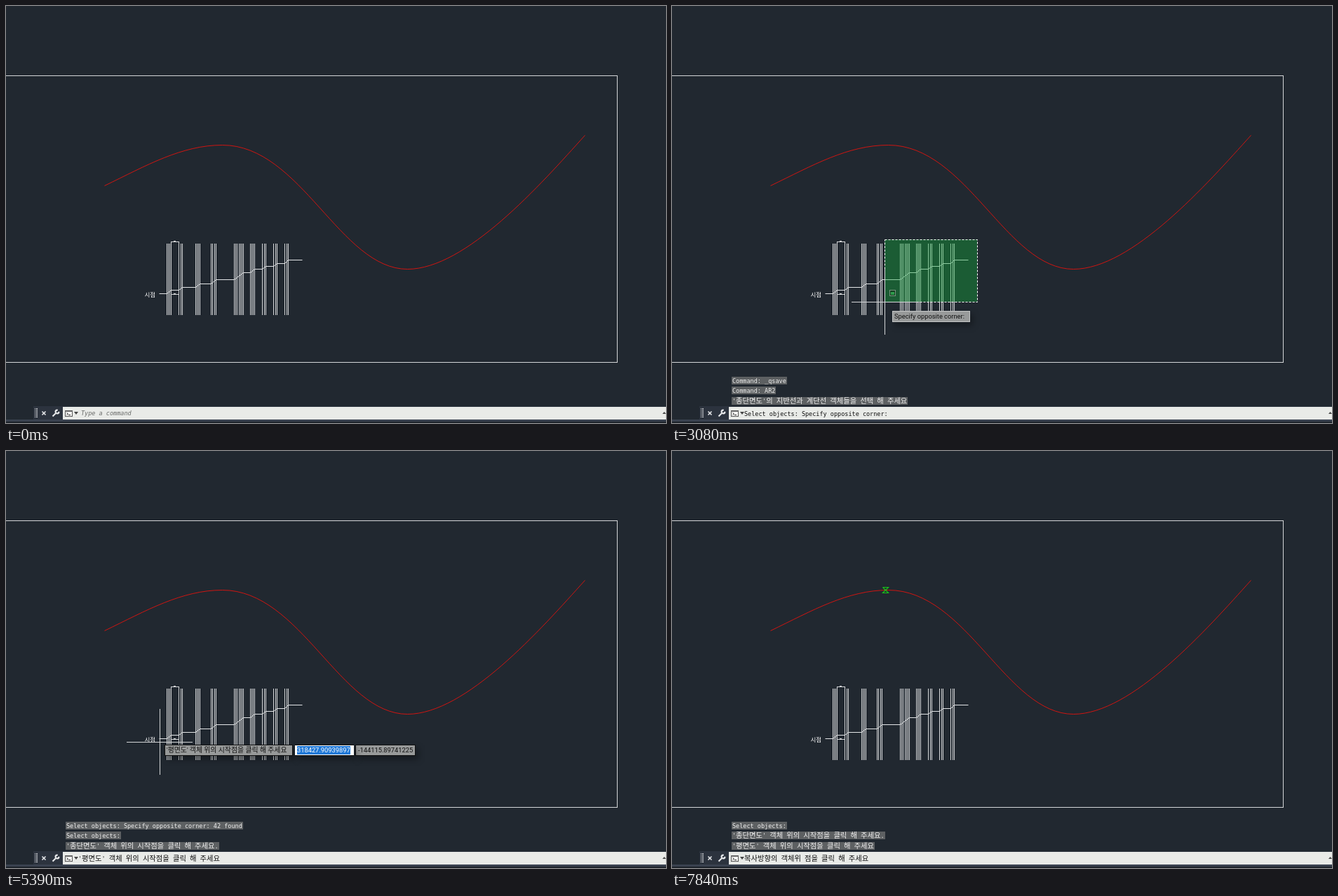
Animation of 941x595 px, one loop 8000 ms. Source, as an HTML page with a canvas:

```html
<!DOCTYPE html>
<html lang="ko">
<head>
<meta charset="utf-8">
<style>
html, body { margin: 0; width: 100%; height: 100%; overflow: hidden; background: #212830; }
canvas { display: block; }
</style>
</head>
<body>
<canvas id="stage" width="941" height="595"></canvas>
<script>
const ctx = document.getElementById('stage').getContext('2d');
const LOOP = 8000, STEP = 70;
const HANGUL = '"Noto Sans CJK KR", "Noto Sans CJK JP", sans-serif';
const MONO = ['8.5px "DejaVu Sans Mono", monospace', '10.3px ' + HANGUL];
const SANS = ['9.3px Roboto, "Open Sans", sans-serif', '9.9px ' + HANGUL];
const LINE = '#d4d6d8', GREEN = '#18c418', GRAY = '#989a9a', LIGHT = '#c4c6c6', INK = '#111';

const ASK_LINES = "'종단면도'의 지반선과 계단선 객체들을 선택 해 주세요";
const ASK_PROFILE = "'종단면도' 객체 위의 시작점을 클릭 해 주세요.";
const ASK_PLAN = "'평면도' 객체 위의 시작점을 클릭 해 주세요";
const ASK_DIRECTION = '복사방향의 객체위 점을 클릭 해 주세요';
const SELECT = 'Select objects:', CORNER = 'Specify opposite corner:';
const FOUND = `${SELECT} ${CORNER} 42 found`;

const log = ['Command: _qsave', 'Command: AR2', ASK_LINES, FOUND, SELECT, ASK_PROFILE, ASK_PLAN];
const prompts = [
  { at: 2310, bar: SELECT, logEnd: 3 },
  { at: 2730, bar: `${SELECT} ${CORNER}`, logEnd: 3, still: true },
  { at: 3570, bar: SELECT, logEnd: 4 },
  { at: 4270, bar: ASK_PROFILE, logEnd: 5 },
  { at: 5250, bar: ASK_PLAN, logEnd: 6 },
  { at: 6790, bar: ASK_DIRECTION, logEnd: 7 }
];

// Each hop eases the cursor to (x, y) between two times.
const cursorStart = [448, 392];
const hops = [
  { from: 980, to: 1330, x: 464, y: 394 },
  { from: 2380, to: 2660, x: 435, y: 333 },
  { from: 2730, to: 3080, x: 303, y: 422 },
  { from: 3080, to: 3360, x: 201, y: 465 },
  { from: 3780, to: 4200, x: 221, y: 425 },
  { from: 4200, to: 4340, x: 219, y: 415 },
  { from: 5390, to: 5880, x: 136, y: 248 },
  { from: 6370, to: 6650, x: 139, y: 255 },
  { from: 6790, to: 7490, x: 304, y: 192 }
];

// Flights of stairs along the profile: left edge and width
const flights = [[229, 6], [246, 5], [270, 6], [292, 7], [325, 13], [348, 6], [365, 5], [381, 5], [397, 5]];
const SLOPE = 0.82;

function rect(x, y, w, h, color) {
  ctx.fillStyle = color;
  ctx.fillRect(x, y, w, h);
}
const hLine = (x0, x1, y, color = LINE) => rect(x0, y, x1 - x0 + 1, 1, color);
const vLine = (x, y0, y1, color = LINE) => rect(x, y0, 1, y1 - y0 + 1, color);

function frame(x, y, w, h, color) {
  ctx.strokeStyle = color;
  ctx.lineWidth = 1;
  ctx.strokeRect(x + 0.5, y + 0.5, w - 1, h - 1);
}

function polyline(points, color, width = 1) {
  ctx.beginPath();
  for (const [x, y] of points) ctx.lineTo(x + 0.5, y + 0.5);
  ctx.strokeStyle = color;
  ctx.lineWidth = width;
  ctx.stroke();
}

function triangle(x, y, half, height) {
  ctx.beginPath();
  ctx.moveTo(x - half, y);
  ctx.lineTo(x + half, y);
  ctx.lineTo(x, y + height);
  ctx.fillStyle = '#444';
  ctx.fill();
}

// Lays out Latin and Hangul runs; only measures when no colour is given.
function label(text, fonts, x, y, color) {
  let width = 0;
  for (const run of text.match(/[가-힣]+|[^가-힣]+/g) || []) {
    ctx.font = fonts[/[가-힣]/.test(run) ? 1 : 0];
    if (color) {
      ctx.fillStyle = color;
      ctx.fillText(run, x + width, y);
    }
    width += ctx.measureText(run).width;
  }
  return width;
}
const widthOf = (text, fonts) => Math.round(label(text, fonts, 0, 0));

function cursorAt(t) {
  let [x, y] = cursorStart;
  for (const hop of hops) {
    const u = Math.min(1, Math.max(0, (t - hop.from) / (hop.to - hop.from)));
    const k = u * u * (3 - 2 * u);
    x += (hop.x - x) * k;
    y += (hop.y - y) * k;
  }
  return [Math.round(x), Math.round(y)];
}

function drawPlan() {
  rect(0, 0, 941, 595, '#212830');
  hLine(0, 871, 99);
  hLine(0, 871, 508);
  vLine(871, 99, 508);
  ctx.save();
  ctx.translate(0.5, 0.5);
  ctx.beginPath();
  ctx.moveTo(140, 256);
  ctx.bezierCurveTo(200, 227, 250, 198, 308, 198);
  ctx.bezierCurveTo(420, 198, 476, 375, 572, 375);
  ctx.bezierCurveTo(655, 375, 762, 254, 825, 184);
  ctx.strokeStyle = '#ee120c';
  ctx.lineWidth = 0.85;
  ctx.stroke();
  ctx.restore();
}

function drawProfile(selected) {
  let y = 410;
  const ground = [[218, y]];
  for (const [x, w] of flights) {
    ground.push([x, Math.round(y)]);
    y -= w * SLOPE;
    ground.push([x + w, Math.round(y)]);

    const treads = Math.floor(w / 2);
    for (let i = 0; i <= treads; i++) {
      const px = Math.round(x + w * i / treads);
      if (selected) rect(px - 1, 339, 3, 102, 'rgba(0,127,255,.4)');
      vLine(px, 339, 440);
    }
  }
  ground.push([422, Math.round(y)]);
  if (selected) polyline(ground, 'rgba(0,127,255,.5)', 3);
  polyline(ground, '#e4e6e8');

  hLine(235, 246, 336);
  vLine(235, 336, 340);
  vLine(246, 336, 340);
  hLine(235, 246, 411);
  hLine(239, 241, 335);
  hLine(239, 241, 410);
  label('시점', [MONO[0], '8.5px ' + HANGUL], 197.5, 414.5, '#fff');
}

function drawCross([x, y]) {
  hLine(x - 47, x + 46, y);
  vLine(x, y - 47, y + 46);
}

function drawPickBox([x, y]) {
  frame(x - 6, y - 6, 12, 12, LINE);
}

function drawBox(x, y, w, fill, border) {
  ctx.save();
  ctx.shadowColor = 'rgba(0,0,0,.35)';
  ctx.shadowBlur = 10;
  ctx.shadowOffsetX = 4;
  ctx.shadowOffsetY = 5;
  rect(x, y, w, 16, fill);
  ctx.restore();
  frame(x, y, w, 16, border);
}

function drawTip(text, x, y, border) {
  const w = widthOf(text, SANS) + 11;
  drawBox(x, y, w, GRAY, border);
  label(text, SANS, x + 3, y + 10.5, INK);
  return x + w;
}

function drawFields(x, y, first, second, secondX = x + 86) {
  const w = widthOf(first, SANS);
  drawBox(secondX, y, widthOf(second, SANS) + 8, GRAY, INK);
  label(second, SANS, secondX + 4, y + 10.5, INK);
  drawBox(x, y, w + 8, '#fff', INK);
  rect(x, y + 1, w + 8, 14, '#fff');
  rect(x + 3, y + 2, w, 12, '#1f78d7');
  label(first, SANS, x + 3, y + 10.5, '#fff');
}

// World coordinates of a stage point
function coordinates([x, y]) {
  const east = 304587.7102311 + (x - 136) * 13840.19916787 / 83;
  const north = -116336.34105105 - (y - 248) * 27779.5563612 / 167;
  return [east, north].map(v => String(+v.toFixed(8)));
}

function drawWindow([x, y]) {
  const [x0, y0] = [435, 333];
  const left = Math.min(x, x0), top = Math.min(y, y0);
  const w = Math.abs(x - x0), h = Math.abs(y - y0);
  rect(left, top, w, h, 'rgba(18,170,58,.4)');
  ctx.setLineDash([3, 2]);
  frame(left, top, w + 1, h + 1, '#fff');
  ctx.setLineDash([1, 1]);
  rect(x + 7, y - 17, 9, 9, '#123d20');
  frame(x + 7, y - 17, 9, 9, '#dfe8df');
  ctx.setLineDash([]);
  rect(x + 9, y - 14, 5, 4, '#2e9c4c');
}

function drawEndSnap(x, y) {
  frame(x - 4, y - 4, 9, 9, GREEN);
}

function drawNearSnap(x, y) {
  polyline([[x - 4, y - 4], [x + 4, y - 4], [x - 4, y + 4], [x + 4, y + 4], [x - 4, y - 4]], GREEN, 1.2);
}

function drawTyping([x, y], t) {
  const count = t < 1540 ? 1 : t < 1890 ? 2 : 3;
  rect(x + 9, y + 11, 31, 15, '#fff');
  frame(x + 9, y + 11, 31, 15, '#777');
  label('AR2'.slice(0, count), SANS, x + 12, y + 22, INK);
}

function drawDirection([x, y], tipX, tipY) {
  const dx = x - 140, dy = 256 - y;
  const angle = Math.abs(Math.round(Math.atan2(dy, dx) * 180 / Math.PI));
  const distance = (Math.hypot(dx, dy) * 166.7).toFixed(4);
  polyline([[140, 256], [x, y]], LINE);
  drawCross([x, y]);
  const right = drawTip(ASK_DIRECTION, tipX, tipY, INK) + 3;
  drawFields(right, tipY, distance, '< ' + angle, right + widthOf(distance, SANS) + 11);
}

function drawPointer(t) {
  const at = cursorAt(t), [x, y] = at;
  // Prompts with fields run one step ahead of the crosshair.
  const ahead = cursorAt(t + STEP);
  const tipX = ahead[0] + 12, tipY = ahead[1] + 13;

  if (t < 980) return;
  if (t < 2170) {
    drawCross(at);
    if (t >= 1330) drawTyping(at, t);
  } else if (t < 2730) {
    drawPickBox(at);
    if (t >= 2310) drawTip(SELECT, x + 10, y + 10, LIGHT);
  } else if (t < 3570) {
    drawWindow(at);
    drawCross(at);
    if (t >= 2800) drawTip(CORNER, x + 11, y + 13, LIGHT);
  } else if (t < 4200) {
    drawPickBox(at);
    drawTip(SELECT, x + 10, y + 10, LIGHT);
  } else if (t < 4270) {
    const fieldX = tipX + widthOf(ASK_PROFILE, SANS) + 14;
    drawCross(at);
    drawTip(SELECT, tipX, tipY, INK);
    rect(fieldX, tipY, 69, 14, '#fff');
    rect(fieldX + 71, tipY, 87, 14, GRAY);
  } else if (t < 6790) {
    drawCross(at);
    const right = drawTip(t < 5250 ? ASK_PROFILE : ASK_PLAN, tipX, tipY, INK);
    drawFields(right + 3, tipY, ...coordinates(at));
    if (t >= 4900 && t < 5250) drawEndSnap(219, 410);
    if (t >= 6580) drawEndSnap(140, 256);
  } else {
    if (t < 7840) drawDirection(at, tipX, tipY);
    if (t >= 7490) drawNearSnap(304, 198);
  }
}

function drawLog(prompt, age) {
  const shift = prompt.still ? 0 : Math.max(0, 12 - age / STEP * 6);
  log.slice(prompt.logEnd - 3, prompt.logEnd).forEach((text, i) => {
    const top = Math.round(529 + i * 14.25 + shift);
    ctx.globalAlpha = shift && i === 0 ? 0.65 : 1;
    rect(85, top, widthOf(text, MONO) + 2, 11, '#5d6062');
    label(text, MONO, 86, top + 8.5, '#f0f0f0');
  });
  ctx.globalAlpha = 1;
}

function drawBarIcons() {
  const pale = '#e4e6e8';
  for (let y = 574; y < 588; y += 2) {
    rect(41, y, 1, 1, pale);
    rect(43, y, 2, 1, pale);
  }
  polyline([[51, 578], [56, 583]], pale, 1.6);
  polyline([[56, 578], [51, 583]], pale, 1.6);
  polyline([[66, 585], [71, 580]], pale, 2.2);
  ctx.beginPath();
  ctx.arc(73, 579, 2.4, -0.1, Math.PI * 1.6);
  ctx.stroke();

  rect(84, 577, 11, 9, '#f5f5f3');
  frame(84, 577, 11, 9, '#555');
  hLine(84, 94, 578, '#777');
  polyline([[86, 580], [88, 581.5], [86, 583]], '#333');
  hLine(89, 91, 583, '#333');
  triangle(100, 579, 3, 4);
  triangle(938.5, 582, 2.5, -3);
}

function drawBar(text) {
  rect(39, 571, 902, 19, '#2c333e');
  rect(0, 590, 941, 3, '#3a4250');
  rect(0, 593, 941, 2, '#1d232b');
  rect(81, 572, 860, 18, '#e9ebe8');
  drawBarIcons();
  if (text) {
    label(text, MONO, 103, 584.5, INK);
  } else {
    label('Type a command', ['italic ' + MONO[0]], 107, 583.5, '#696b69');
  }
}

function draw(now) {
  const t = Math.floor((now % LOOP) / STEP) * STEP;
  const prompt = prompts.filter(p => p.at <= t).pop();
  drawPlan();
  drawProfile(t >= 3570 && t < 4200);
  drawPointer(t);
  if (prompt) drawLog(prompt, t - prompt.at);
  drawBar(prompt && prompt.bar);
}

const start = performance.now();
function tick() {
  draw(performance.now() - start);
  requestAnimationFrame(tick);
}
tick();
</script>
</body>
</html>
```
